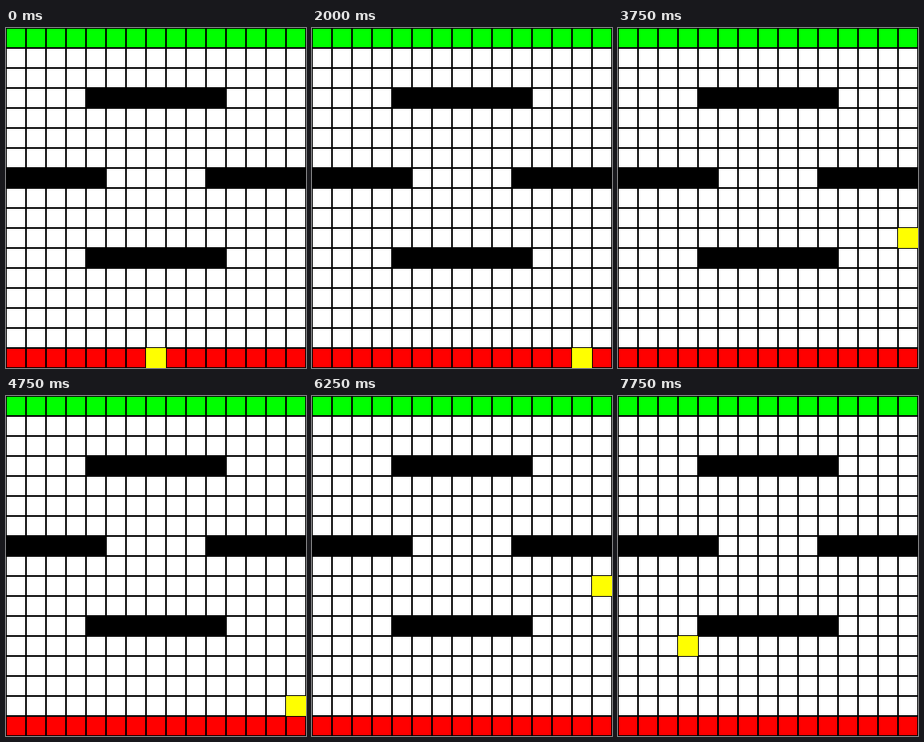
These frames come from a looping animation (375 px wide and 425 px high, 8000 ms). An HTML page with a canvas:

```html
<!DOCTYPE html>
<html lang="en">
<head>
<meta charset="utf-8">
<title>Grid track</title>
<style>
  html, body { margin: 0; width: 100%; height: 100%; overflow: hidden; background: #fff; }
  canvas { display: block; }
</style>
</head>
<body>
<canvas id="stage" width="375" height="425"></canvas>
<script>
const CELL = 25, COLS = 15, ROWS = 17, BASE = ROWS - 1, MID = 7;
const TICK = 250, TICKS = 32;
const ctx = document.getElementById('stage').getContext('2d');

// Each climb starts on the red row, enters its lane, and spends one tick back on the red row.
const climbs = [
  { start: 8, col: 13, lane: 14, backTick: 4, backCol: MID },
  { start: 17, col: 13, lane: 14, backTick: 6, backCol: MID },
  { start: 26, col: 2, lane: 3, backTick: 2, backCol: 3 }
];

// Opening run: hop right two cells on every other tick.
function crawl(tick) {
  if (tick < 2) return [MID, BASE];
  if (tick < 3) return [MID + 1, BASE];
  return [MID + 1 + 2 * Math.floor((tick - 3) / 2), BASE - 1];
}

function climb({ start, col, lane, backTick, backCol }, tick) {
  const k = tick - start;
  if (k < 2) return [col, BASE];
  if (k === backTick) return [backCol, BASE];
  const n = k > backTick ? k - 2 : k - 1;
  const rise = n > 2 ? n + 1 : n; // the third move covers two cells
  return [lane, BASE - rise];
}

function carAt(tick) {
  const run = climbs.findLast(({ start }) => start <= tick);
  return run ? climb(run, tick) : crawl(tick);
}

function fillCells(color, col, row, count = 1) {
  ctx.fillStyle = color;
  ctx.fillRect(col * CELL, row * CELL, count * CELL, CELL);
}

function drawCell(col, row) {
  fillCells('#000', col, row);
  ctx.fillStyle = row === 0 ? '#0f0' : row === BASE ? '#f00' : '#fff';
  ctx.fillRect(col * CELL + 1, row * CELL + 1, CELL - 2, CELL - 2);
}

function drawTrack() {
  for (let row = 0; row < ROWS; row++) {
    for (let col = 0; col < COLS; col++) drawCell(col, row);
  }
  for (const row of [3, 11]) fillCells('#000', 4, row, 7);
  for (const col of [0, 10]) fillCells('#000', col, 7, 5);
}

function draw(time) {
  const tick = Math.floor(time / TICK) % TICKS;
  drawTrack();
  fillCells('#ff0', ...carAt(tick));
}

const began = performance.now();
function frame() {
  draw(performance.now() - began);
  requestAnimationFrame(frame);
}
frame();
</script>
</body>
</html>
```
